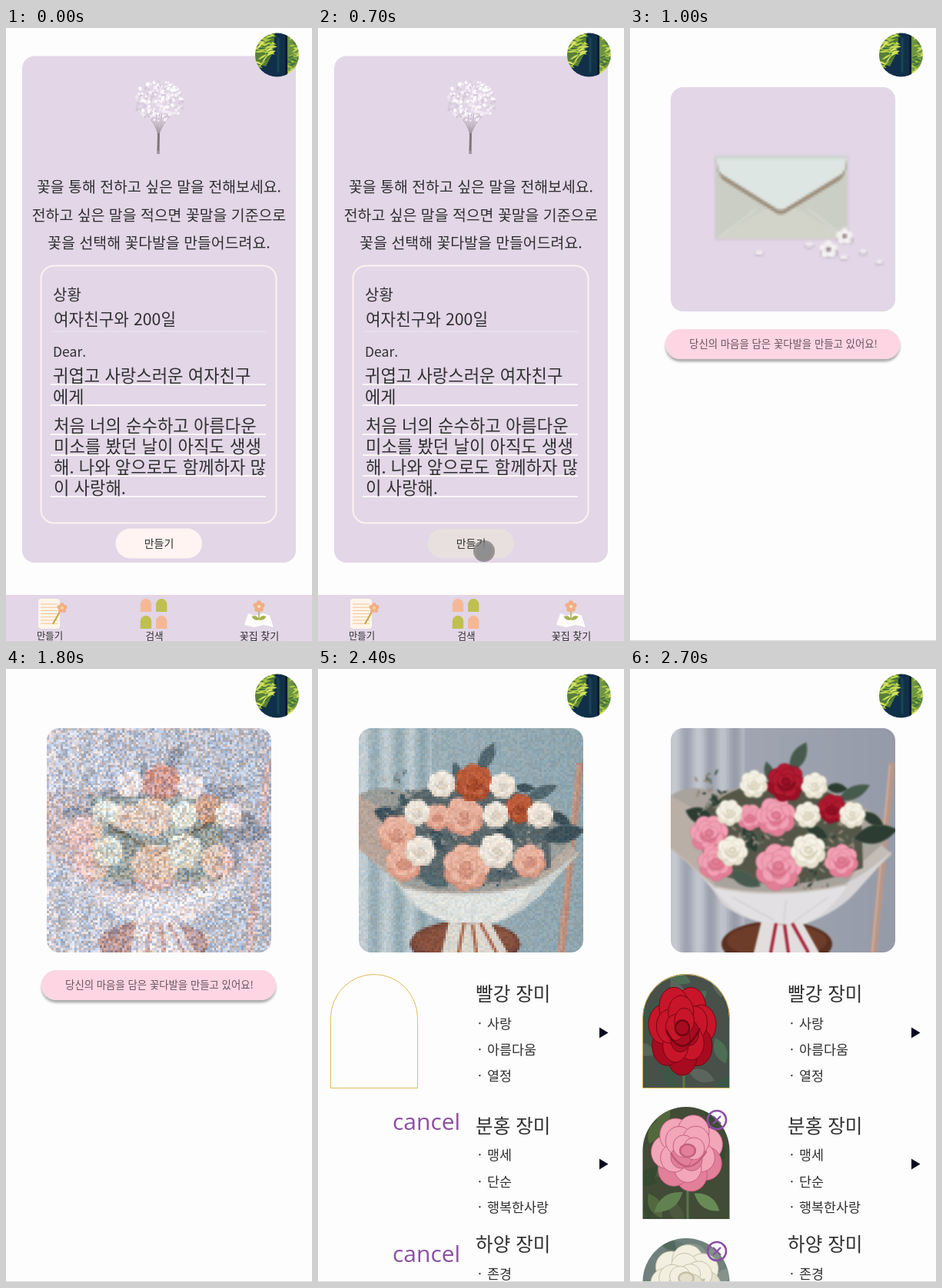
An HTML page with a canvas for the animation above (2750 ms loop, 398 by 798 pixels).

```html
<!DOCTYPE html>
<html lang="ko">
<head>
<meta charset="utf-8">
<style>
  html, body { margin: 0; width: 398px; height: 798px; overflow: hidden; background: #fdfdfd; }
  svg { display: block; }
  canvas { position: absolute; left: 53px; top: 77px; border-radius: 16px; }
  text { font-family: "Noto Sans CJK KR", "Noto Sans CJK JP", sans-serif; font-weight: 300; fill: #303030; }
  .alt { font-family: "Open Sans", sans-serif; font-weight: 400; fill: #8a50a4; }
</style>
</head>
<body>
<svg id="stage" width="398" height="798" viewBox="0 0 398 798"></svg>
<canvas id="photo" width="292" height="292"></canvas>
<script>
const LOOP = 2750, SIZE = 292, CELLS = 98;
const LILAC = '#e2d6e7', PEACH = '#f4b896', OLIVE = '#bfc04f';

const ramp = (t, a, b) => Math.max(0, Math.min(1, (t - a) / (b - a)));
function seeded(s) {
  return () => {
    s = (s + 0x6d2b79f5) | 0;
    let v = Math.imul(s ^ (s >>> 15), 1 | s);
    v = (v + Math.imul(v ^ (v >>> 7), 61 | v)) ^ v;
    return ((v ^ (v >>> 14)) >>> 0) / 4294967296;
  };
}

// Shapes are { d, f, s, w }: path, fill, stroke, stroke width.
const shape = (d, f = 'none', s = 'none', w = 1) => ({ d, f, s, w });
const oval = (x, y, rx, ry = rx) =>
  `M${x - rx} ${y}a${rx} ${ry} 0 1 0 ${2 * rx} 0a${rx} ${ry} 0 1 0 ${-2 * rx} 0z`;
const box = (x, y, w, h) => `M${x} ${y}h${w}v${h}h${-w}z`;
function leaf(x, y, len, wide, deg) {
  const a = deg * Math.PI / 180, c = Math.cos(a), s = Math.sin(a);
  const at = (u, v) => `${(x + u * c - v * s).toFixed(1)} ${(y + u * s + v * c).toFixed(1)}`;
  return `M${at(-len / 2, 0)}Q${at(0, -wide)} ${at(len / 2, 0)}Q${at(0, wide)} ${at(-len / 2, 0)}z`;
}
const toSvg = list => list.map(p =>
  `<path d="${p.d}" fill="${p.f}" stroke="${p.s}" stroke-width="${p.w}"/>`).join('');
function paint(g, list) {
  for (const p of list) {
    const path = new Path2D(p.d);
    if (p.f !== 'none') { g.fillStyle = p.f; g.fill(path); }
    if (p.s !== 'none') { g.strokeStyle = p.s; g.lineWidth = p.w; g.stroke(path); }
  }
}

// Overlapping petals in shrinking rings, lit from above.
function rose(x, y, r, [dark, mid, light], tall = 1) {
  const out = [shape(oval(x, y, r * .85, r * .85 * tall), mid)];
  const rings = [[.55, .42, 7], [.38, .36, 5], [.2, .28, 4]];
  rings.forEach(([dist, size, n], k) => {
    for (let i = 0; i < n; i++) {
      const a = i / n * 2 * Math.PI + k * .7 + x;
      const lit = Math.sin(a) < .25 || k === 1;
      out.push(shape(oval(x + Math.cos(a) * r * dist, y + Math.sin(a) * r * dist * tall,
        r * size, r * size * tall), lit ? light : mid, dark, r * .02));
    }
  });
  out.push(shape(oval(x, y - r * .06, r * .2, r * .16 * tall), mid, dark, r * .05));
  out.push(shape(`M${x - r * .45} ${y}Q${x} ${y + r * .7 * tall} ${x + r * .5} ${y - r * .05}`, 'none', dark, r * .05));
  return out;
}
function flower(x, y, r, petal, core) {
  const out = [];
  for (let i = 0; i < 5; i++) {
    const a = i * 1.2566 - 1.57;
    out.push(shape(oval(x + Math.cos(a) * r * .6, y + Math.sin(a) * r * .6, r * .42), petal));
  }
  out.push(shape(oval(x, y, r * .28), core));
  return out;
}

const envelope = () => {
  const out = [
    shape(box(0, 0, SIZE, SIZE), LILAC),
    shape('M57 89H231V199H57z', '#d6cbd3'),
    shape('M59 91H229V197H59z', '#cbcec4'),
    shape('M59 197L136 150H152L229 197z', '#d2d4ca'),
    shape('M63 195L112 158M226 195L178 158', 'none', '#dfe0d8', 2),
    shape('M59 96Q62 118 70 122L136 163Q143 168 150 163L218 122Q228 116 229 96z', '#9d8f7f'),
    shape('M59 91H229Q228 109 222 113L150 157Q143 162 136 157L66 113Q60 109 59 91z', '#dde6e2'),
    shape('M59 92H229', 'none', '#c6d0cd', 2)
  ];
  for (const [x, y, r] of [[226, 194, 11], [205, 211, 12]]) {
    out.push(shape(oval(x + 1, y + 5, r, r * .6), '#c8b8c8'), ...flower(x, y, r, '#f5f2f3', '#9c8a8c'));
  }
  for (const [x, y] of [[180, 205], [115, 215], [250, 214], [225, 221], [271, 227]])
    out.push(shape(oval(x, y + 2, 6, 3), '#c3b0c3'), shape(oval(x, y, 5, 3), '#f3eef2'));
  return out;
};

// k blends the cool sketch palette (0) into the final one (1).
function bouquet(k) {
  const rgb = h => [1, 3, 5].map(i => parseInt(h.slice(i, i + 2), 16));
  const mix = (a, b) => {
    const p = rgb(a), q = rgb(b);
    return `rgb(${p.map((v, i) => Math.round(v + (q[i] - v) * k))})`;
  };
  const rnd = seeded(21), out = [];
  const add = (...a) => out.push(shape(...a));
  const white = [mix('#b9aea0', '#c3baa0'), mix('#e6dbcd', '#e8e2d0'), mix('#f3ece2', '#f6f3e7')];
  const pink = [mix('#b87766', '#cc647e'), mix('#dc9c87', '#e27f96'), mix('#ebb8a4', '#f2a1b4')];
  const red = [mix('#883a22', '#72091a'), mix('#ad4f30', '#9a1026'), mix('#c06140', '#b11a30')];
  const green = [mix('#3d5058', '#2c3c32'), mix('#52676e', '#465b4d'), mix('#687b7f', '#627466')];

  for (let x = 0; x < SIZE; x += 4) {
    const l = x < 96 ? 73 + 7 * Math.sin(x * .2 + 1) - x * .04 : 66 - (x - 96) * .02;
    add(box(x, 0, 5, SIZE), `hsl(${197 + 25 * k},${16 - 6 * k}%,${l}%)`);
  }
  add('M284 45H292L268 292H259z', mix('#b98a77', '#b99686'));
  add('M285 48L262 292', 'none', mix('#d0a595', '#d0b2a4'), 2);
  add(oval(138, 281, 72, 30), mix('#74473a', '#5a3020'));
  add(oval(138, 277, 65, 22), mix('#87513e', '#6d3d2a'));

  add('M0 88Q25 70 60 84Q145 58 235 92L276 118V155L245 200Q145 240 48 200L0 155z', mix('#9a9c99', '#a9a39d'));
  add('M0 88L36 108L58 205L0 157z', mix('#b7a59a', '#b9afa7'));
  add('M274 152L245 178L222 214Q262 190 288 164z', mix('#b7aca2', '#c4bdb6'));
  add('M32 124Q60 76 140 68Q220 76 248 118L250 182Q145 222 48 186z', mix('#59666a', '#545648'));

  const leaves = [[166, 38, 44, 18, -62], [38, 114, 40, 21, 20], [266, 138, 58, 24, -12],
    [238, 84, 46, 16, -25], [190, 135, 34, 15, 30], [103, 144, 40, 18, 65], [96, 196, 46, 18, 25],
    [216, 78, 28, 13, 5], [62, 100, 34, 14, 60], [128, 58, 30, 12, 75], [262, 118, 34, 14, 30]];
  leaves.forEach(([x, y, l, w, a], i) => {
    add(leaf(x, y, l, w, a), green[i % 3 ? 0 : 1], green[2], .6);
  });
  for (let i = 0; i < 170; i++) {
    const [x, y, w] = [[52, 84, 40], [218, 146, 40], [184, 192, 44], [104, 130, 70], [145, 140, 160]][i % 5];
    add(leaf(x + (rnd() - .5) * w, y + (rnd() - .5) * 56, 5 + rnd() * 7, 3, rnd() * 180),
      i % 2 ? green[i % 3] : mix('#9c9c96', '#97897d'));
  }

  const groups = [
    [pink, [[50, 138, 26], [59, 175, 25], [103, 116, 18], [222, 173, 23], [137, 115, 27], [140, 181, 32]]],
    [red, [[150, 71, 26], [210, 105, 20]]],
    [white, [[108, 73, 19], [187, 75, 18], [76, 110, 18], [178, 113, 18], [236, 113, 18], [80, 160, 21], [179, 160, 24]]]
  ];
  for (const [tones, spots] of groups)
    for (const [x, y, r] of spots) out.push(...rose(x, y, r, tones));

  add('M0 156Q45 192 57 206Q140 223 225 203Q252 192 290 158Q262 190 242 212Q220 238 175 255H126Q82 245 65 226Q48 196 0 156z', mix('#cbd0ce', '#d6d4d5'));
  add('M57 209Q140 226 230 205Q205 243 172 255H126Q82 245 57 209z', mix('#dfe2df', '#e2e0e2'));
  add('M0 156Q45 195 57 206Q140 223 230 203', 'none', mix('#b7a79c', '#c4b9b0'), 2);
  add('M80 220L134 250M205 220L160 252M150 224L147 252', 'none', mix('#c3cecf', '#cfced2'), 1.5);
  add('M118 251Q145 260 170 251L193 292H108z', mix('#d9d6ce', '#e2dedd'));
  const ribbon = mix('#ad654a', '#a4243a');
  add('M137 254L130 292M158 254L179 292M148 256L153 292', 'none', ribbon, 4);
  return out;
}

// ---- Interface ----
const text = (s, x, mid, size, extra = '') =>
  `<text x="${x}" y="${(mid + size * .37).toFixed(1)}" font-size="${size}" ${extra}>${s}</text>`;
const centred = (s, x, mid, size, extra = '') => text(s, x, mid, size, `text-anchor="middle" ${extra}`);
const rect = (x, y, w, h, r, f, extra = '') =>
  `<rect x="${x}" y="${y}" width="${w}" height="${h}" rx="${r}" fill="${f}" ${extra}/>`;
const group = (id, body, extra = '') => `<g id="${id}" ${extra}>${body}</g>`;

function avatar() {
  const rnd = seeded(4);
  const list = [shape(box(323, 5, 60, 60), '#10304a'),
    shape('M323 5H350L347 32L338 50L323 46z', '#587f38'), shape('M366 5H383V65H366z', '#6d9440')];
  for (let i = 0; i < 80; i++) {
    const left = i % 3, x = left ? 325 + rnd() * 22 : 368 + rnd() * 14;
    const y = left ? 9 + rnd() * (370 - x) : 7 + rnd() * 54;
    list.push(shape(leaf(x, y, 8 + rnd() * 7, 2.5, -50 + rnd() * 80),
      ['#a9c53f', '#c6da52', '#42703a', '#d8e468'][i % 4]));
  }
  list.push(shape('M364.5 7V63', 'none', '#071d2d', 3), shape('M354 12V58', 'none', '#1d4354', 3));
  return `<clipPath id="round"><circle cx="352.5" cy="35" r="28.5"/></clipPath>` +
    `<g clip-path="url(#round)" filter="url(#soft)">${toSvg(list)}</g>`;
}

function driedFlowers() {
  const rnd = seeded(9), list = [];
  for (let i = 0; i < 9; i++)
    list.push(shape(`M${183 + i * 4} 112Q${195 + i} 126 ${197.5 + i * .2} 138L${196.5 + i * .4} 164`, 'none', '#9a8d96', .6));
  for (let i = 0; i < 200; i++) {
    const a = rnd() * 6.283, r = Math.sqrt(rnd());
    list.push(shape(oval(199.5 + Math.cos(a) * r * 32, 95 + Math.sin(a) * r * 26, 1 + rnd() * 1.5),
      ['#ffffff', '#f8f1f8', '#f0e7f2', '#d6c9d9'][i % 4]));
  }
  list.push(shape('M197 137H200L199 160H197z', '#83747d'));
  return toSvg(list);
}

function navBar() {
  const arch = (x, y, f) => shape(`M${x} ${y + 17}v-9a7.2 8 0 0 1 14.4 0v9z`, f);
  const icons = [
    ...[0, 1, 2, 3, 4, 5, 6].map(i => shape(`M45 ${750 + i * 4.2}H67`, 'none', '#f0c39c', 1)),
    shape('M61 776L71 758', 'none', '#c3a43d', 2),
    ...flower(73, 755, 6.5, '#f1ad85', '#f8dc9a'),
    arch(174.8, 743, PEACH), arch(195, 743, OLIVE), arch(174.8, 765, OLIVE), arch(195, 765, PEACH),
    shape('M315 762L323 765L335 762L343 765L348 780L335 777L323 780L310 777z', '#fffdfb'),
    shape('M329 758V770', 'none', '#a5b04a', 1.5),
    shape(leaf(324.5, 768, 11, 5, 25), '#a5b04a'), shape(leaf(333.5, 768, 11, 5, -25), '#a5b04a'),
    ...flower(329, 753, 7.5, '#f1ad85', '#fbe3b5')
  ];
  return rect(0, 738, 398, 60, 0, LILAC) + rect(42, 743, 28, 39, 4, '#fff5e8') + toSvg(icons) +
    centred('만들기', 57, 791, 12.4) + centred('검색', 193, 791, 12.6) + centred('꽃집 찾기', 329.5, 791, 13);
}

function formPage() {
  const lines = [464, 491, 529, 556, 583, 610].map(y => shape(`M58 ${y}H338`, 'none', '#fff8f8', 1.8));
  return rect(21, 36.5, 356, 659.5, 16, LILAC) + driedFlowers() +
    centred('꽃을 통해 전하고 싶은 말을 전해보세요.', 199, 207, 19.4) +
    centred('전하고 싶은 말을 적으면 꽃말을 기준으로', 199, 243.5, 19.4) +
    centred('꽃을 선택해 꽃다발을 만들어드려요.', 199, 280, 19.4) +
    rect(45.5, 309.5, 306, 335, 17, 'none', 'stroke="#fff2ef" stroke-width="2"') +
    toSvg([shape('M60 395H339', 'none', '#f1e8f1', 1.2), ...lines]) +
    text('상황', 61, 348, 20) + text('여자친구와 200일', 62, 379, 21.3) + text('Dear.', 61, 421, 17.6) +
    text('귀엽고 사랑스러운 여자친구', 61, 453, 22.2) + text('에게', 61, 480, 22) +
    ['처음 너의 순수하고 아름다운', '미소를 봤던 날이 아직도 생생', '해. 나와 앞으로도 함께하자 많', '이 사랑해.']
      .map((s, i) => text(s, 62, 518 + i * 27, 22.2)).join('') +
    rect(142.5, 651.5, 112.5, 39, 19.5, '#fff4f1', 'id="button"') +
    centred('만들기', 199, 671, 14) + navBar();
}

function waitPage() {
  return rect(46, 392, 305, 39, 19.5, '#fdd5e3', 'filter="url(#drop)"') +
    centred('당신의 마음을 담은 꽃다발을 만들고 있어요!', 199.5, 411, 13.4, 'style="fill:#6b525c"');
}

const archPath = (y, h) => `M16.5 ${y + h}V${y + 57}a56.5 57 0 0 1 113 0V${y + h}z`;

function thumb(y, h, base, tint, list) {
  const rnd = seeded(y), back = [shape(box(10, y - 6, 126, h + 12), base)];
  for (let i = 0; i < 16; i++)
    back.push(shape(leaf(16 + rnd() * 114, y + rnd() * h, 36, 16, rnd() * 180), tint[i % 3]));
  return `<clipPath id="arch${y}"><path d="${archPath(y, h)}"/></clipPath>` +
    `<g clip-path="url(#arch${y})"><g filter="url(#soft)">${toSvg([...back, ...list])}</g></g>`;
}

function listPage() {
  const item = (s, y) => text('·', 208, y, 17.4) + text(s, 220, y, 17.4);
  const arrow = y => shape(`M366 ${y - 7}L377.5 ${y}L366 ${y + 7}z`, '#080820');
  const cross = y => toSvg([shape(oval(113, y, 12), 'none', '#8a50a4', 2.6),
    shape(`M108 ${y - 5}l10 10m0 -10l-10 10`, 'none', '#8a50a4', 2.4)]);
  const stem = (x, y) => shape(`M${x} ${y}V${y + 60}`, 'none', '#587947', 3);
  const thumbs =
    thumb(397, 148, '#48504a', ['#3c5745', '#5c655d', '#4d6d55'],
      [stem(70, 510), ...rose(68, 470, 46, ['#6d0512', '#a80b1f', '#c81529'], 1.32)]) +
    thumb(570, 146, '#414b36', ['#354a30', '#4d573e', '#53673d'],
      [stem(75, 660), shape(leaf(50, 694, 45, 18, -35), '#618250'), shape(leaf(100, 694, 40, 16, 35), '#688b56'),
        ...rose(75, 630, 49, ['#c2607c', '#e27f99', '#f2a6b8'], 1.06)]) +
    thumb(741, 148, '#70807c', ['#647972', '#84928b', '#52685d'],
      rose(73, 796, 48, ['#c2bfa5', '#e2dfcb', '#f2efe1']));
  return text('빨강 장미', 205, 423, 24.6) + item('사랑', 462) + item('아름다움', 496) + item('열정', 530) +
    text('분홍 장미', 205, 595, 24.6) + item('맹세', 633) + item('단순', 668) + item('행복한사랑', 701) +
    text('하양 장미', 205, 749, 24.6) + item('존경', 788) + toSvg([arrow(473.5), arrow(644.5)]) +
    group('empty', text('cancel', 97, 589, 30, 'class="alt"') + text('cancel', 97, 761, 30, 'class="alt"')) +
    group('loaded', thumbs + cross(587) + cross(758)) +
    toSvg([shape(archPath(397.5, 148), 'none', '#dfba5c', 1)]);
}

const $ = id => document.getElementById(id);
$('stage').innerHTML =
  '<defs><filter id="drop" x="-10%" y="-20%" width="120%" height="160%">' +
  '<feDropShadow dx="0" dy="3.5" stdDeviation="1.6" flood-color="#000" flood-opacity=".32"/></filter>' +
  '<filter id="soft"><feGaussianBlur stdDeviation=".7"/></filter></defs>' +
  rect(0, 0, 398, 798, 0, '#fdfdfd') + group('form', formPage()) + group('wait', waitPage()) +
  group('list', listPage()) + group('edge', rect(0, 797, 398, 1, 0, '#d9d9d9')) + avatar() +
  group('cursor', '<circle r="14" fill="#555" fill-opacity=".55"/><circle r="11" fill="#8d8d8d" fill-opacity=".75"/>');

// ---- Picture that forms out of grain ----
const photo = $('photo').getContext('2d');
function canvasOf(size, list, blur = 0) {
  const c = document.createElement('canvas');
  c.width = c.height = size;
  const g = c.getContext('2d', { willReadFrequently: true });
  g.scale(size / SIZE, size / SIZE);
  paint(g, list);
  if (blur) {
    g.resetTransform();
    g.filter = `blur(${blur}px)`;
    g.drawImage(c, 0, 0);
  }
  return c;
}
const letter = canvasOf(CELLS, envelope());
const sketch = canvasOf(CELLS, bouquet(0), .4);
const final = canvasOf(SIZE, bouquet(1), 1);
const work = canvasOf(CELLS, []);
const pixels = c => c.getContext('2d').getImageData(0, 0, CELLS, CELLS);
const from = pixels(letter).data, to = pixels(sketch).data, mixed = pixels(work);
const rnd = seeded(7);
const grain = Array.from({ length: CELLS * CELLS * 2 }, () => rnd() * 2 - 1);

function formPicture(t) {
  const blend = ramp(t, 1450, 2200), rise = ramp(t, 1200, 1700);
  const amp = 34 * rise - 25 * ramp(t, 1800, 2400);
  for (let i = 0; i < CELLS * CELLS; i++) {
    const light = grain[2 * i] * amp, warm = grain[2 * i + 1] * amp * .6;
    for (let c = 0; c < 3; c++) {
      const p = i * 4 + c;
      mixed.data[p] = from[p] + (to[p] - from[p]) * blend + light + (1 - c) * warm;
    }
    mixed.data[i * 4 + 3] = 255;
  }
  work.getContext('2d').putImageData(mixed, 0, 0);
  return work;
}

const bezier = (u, a, b, c, d) =>
  (1 - u) ** 3 * a + 3 * u * (1 - u) ** 2 * b + 3 * u * u * (1 - u) * c + u ** 3 * d;
const show = (id, on) => { $(id).style.display = on ? '' : 'none'; };
let last = -1;

function update(time) {
  const t = Math.floor(time % LOOP / 50) * 50;
  if (t === last) return;
  last = t;
  show('form', t < 800);
  show('wait', t >= 800 && t < 2300);
  show('list', t >= 2300);
  show('edge', t >= 800);
  show('empty', t < 2500);
  show('loaded', t >= 2500);
  show('photo', t >= 800);

  const s = ramp(t, 50, 550), u = s * s * (3 - 2 * s);
  show('cursor', t >= 50 && t < 950);
  $('cursor').setAttribute('transform',
    `translate(${bezier(u, 334, 250, 90, 216)} ${bezier(u, 780, 560, 560, 681)})`);
  $('button').setAttribute('fill', t >= 600 ? '#e8e0de' : '#fff4f1');

  if (t < 800) return;
  photo.imageSmoothingEnabled = t < 1200;
  const picture = t < 1200 ? letter : t < 2550 ? formPicture(t) : final;
  photo.drawImage(picture, 0, 0, SIZE, SIZE);
}

const start = performance.now();
function frame() {
  update(performance.now() - start);
  requestAnimationFrame(frame);
}
update(0);
requestAnimationFrame(frame);
</script>
</body>
</html>
```
